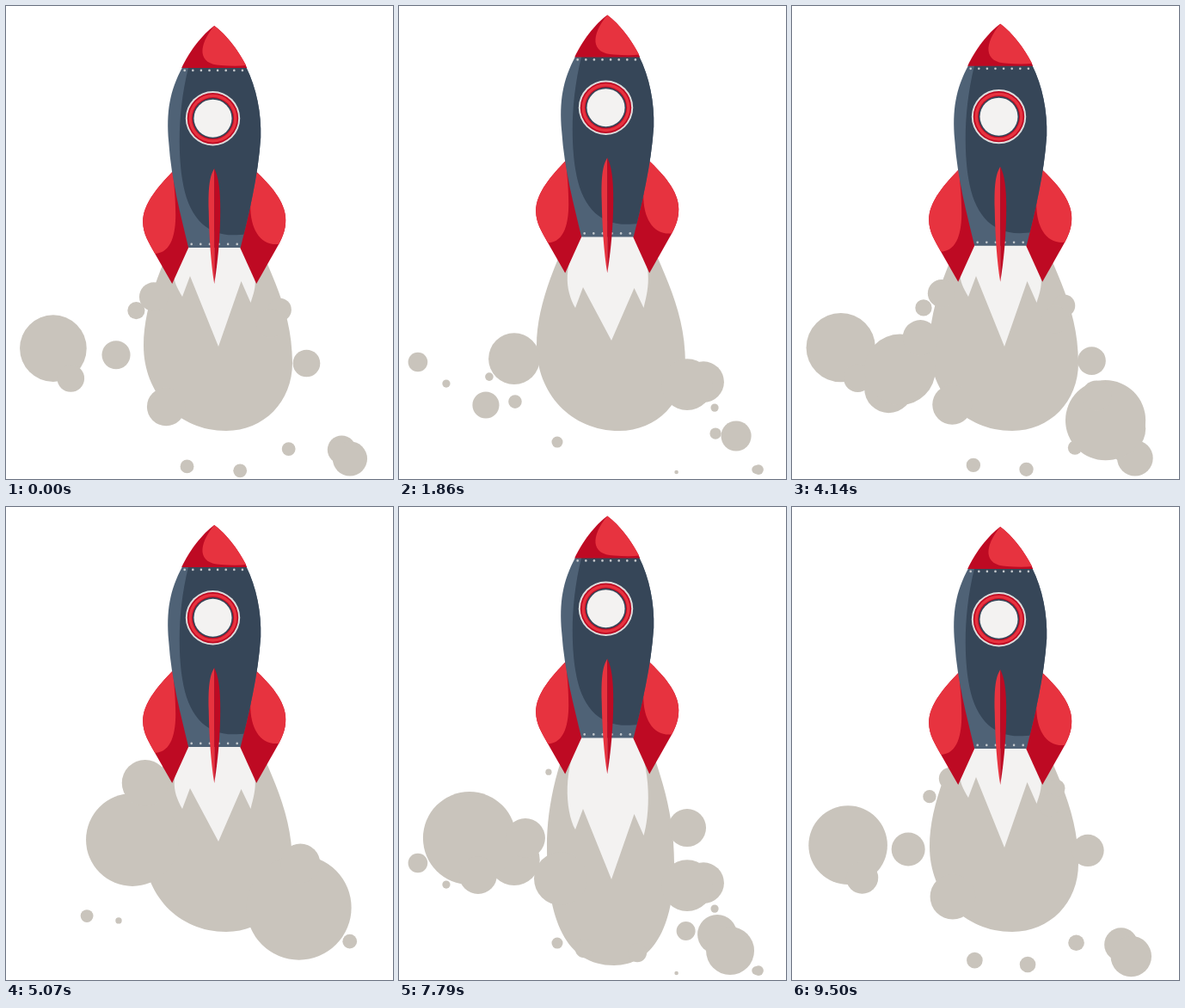
These frames come from a looping animation (450x550 px, 9.57 s). An HTML page with a canvas:

```html
<!DOCTYPE html>
<html lang="en">
<head>
<meta charset="utf-8">
<title>Rocket</title>
<style>
  html, body { margin: 0; width: 100%; height: 100%; overflow: hidden; background: #fff; }
  canvas { display: block; }
</style>
</head>
<body>
<canvas id="stage" width="450" height="550"></canvas>
<script>
const ctx = document.getElementById('stage').getContext('2d');
const LOOP = 9570, FLICKER = LOOP / 3;
const RED = '#e7333f', CRIMSON = '#be0a23', NAVY = '#364658', STEEL = '#4f6276',
      WHITE = '#f3f2f1', SMOKE = '#c9c4bc';

const clamp = u => Math.min(1, Math.max(0, u));
const lerp = (a, b, u) => a + (b - a) * u;
const ease = u => u * u * (3 - 2 * u);
const pulse = (t, peak, width) => ease(clamp(1 - Math.abs(t - peak) / width));

const fill = (color, d) => { ctx.fillStyle = color; ctx.fill(new Path2D(d)); };
const disc = (color, x, y, r) => {
  ctx.fillStyle = color;
  ctx.beginPath();
  ctx.arc(x, y, r, 0, 7);
  ctx.fill();
};

// The rocket alternately rises and sinks, starting at these times
const moves = [100, 800, 1310, 3150, 4000, 4660, 5250, 5870, 6440, 8060];
const bob = t => moves.reduce((y, start, i) =>
  y + (i % 2 ? 12.5 : -12.5) * ease(clamp((t - start) / 550)), 12.5);

// Each puff: position, drift, size
const outer = {
  life: 1.2, span: 810,
  launches: [-365, 1050, 2497, 3800, 5380, 6430, 6980, 7790, 9273],
  puffs: [
    [82, 385, -60, 29, 54], [92, 428, -37, 11, 22], [147, 385, -42, 46, 23],
    [174, 308, -50, 102, 18], [203, 279, -69, 131, 30], [289, 284, 65, 153, 24],
    [285, 310, 50, 130, 30], [335, 373, 32, 94, 22], [188, 432, -4, 75, 31],
    [370, 497, 45, 42, 23], [385, 516, 33, 23, 28]
  ]
};
// Crumbs falling off the bottom of the cloud
for (let angle = -.33; angle < 1; angle += .5) {
  outer.puffs.push([256 + 125 * Math.sin(angle), 395 + 125 * Math.cos(angle), -11, 49, 11]);
}
const inner = {
  life: 1.3, span: 1270,
  launches: [590, 3210, 3597, 5160],
  puffs: [[144, 392, -43, 72, 54], [344, 468, 48, 32, 61], [160, 330, -25, 130, 27], [344, 420, 24, 77, 23]]
};

function drawPuffs({ life, span, launches, puffs }, t) {
  for (const launch of launches) {
    const s = (t - launch) / span;
    if (s < -.25 || s > life) continue;
    const birth = clamp((s + .25) / .18);
    const shrink = 1 - (Math.max(0, s) / life) ** 1.3;
    const swell = lerp(.2, 1, clamp(s)) * clamp((life - s) * 5);
    // Puffs close to the nozzle swell on their way, the others shrink
    for (const [x, y, dx, dy, size] of puffs) {
      disc(SMOKE, x + dx * s, y + dy * s, size * birth * (y < 320 ? swell : shrink));
    }
  }
}

function drawCloud(stretch) {
  const left = lerp(160, 172, stretch), right = lerp(333, 320, stretch);
  const low = lerp(494, 533, stretch), mid = lerp(256, 250, stretch), side = lerp(450, 480, stretch);
  fill(SMOKE, `M${mid} ${low}C${mid - 56} ${low} ${left} ${side} ${left} 395
    C${left} 345 185 290 215 230H275C300 300 ${right} 345 ${right} 415
    C${right} ${side + 10} ${mid + 44} ${low} ${mid} ${low}Z`);
}

function drawFlame(stretch, blunt, shift) {
  const top = 262 + shift, drop = 37 * stretch, side = drop + 13 * blunt;
  fill(WHITE, `M213 ${top}C190 ${top + 40} 193 ${316 + side} 205 ${338 + side}
    L214 ${314 + side}L247 ${396 + drop - 7 * blunt}L273.5 ${320 + drop + 8 * blunt}
    L284.5 ${345 + drop + 6 * blunt}C291 ${325 + drop} 296 ${top + 40} 272 ${top}Z`);
}

function drawRocket() {
  fill(CRIMSON, 'M194 179C178 196 159 216 159 238C159 252 166 262 173 275L193 310L212 268L206 200Z');
  fill(RED, 'M194 179C178 196 159 216 159 238C159 252 166 262 173 275C193 274 197 250 197 230C197 210 195 195 194 179Z');
  fill(CRIMSON, 'M290 179C306 194 325 214 325 236C325 248 321 256 317 264L291 310L272 268L278 200Z');
  fill(RED, 'M290 179C306 194 325 214 325 236C325 248 321 256 317 264C295 266 284 246 284 220Z');

  const hull = 'M205 58C190 86 186 110 189 145C192 190 203 230 212 268H272.5C282 230 293 185 296 140C297 112 291 82 279 58Z';
  fill(STEEL, hull);
  ctx.save();
  ctx.clip(new Path2D(hull));
  fill(NAVY, 'M212 58C199 110 200 160 205 190C212 234 235 260 280 252L300 150V58Z');
  ctx.restore();

  fill(CRIMSON, 'M242 10C228 20 212 41 204 59H280C272 41 256 20 242 10Z');
  fill(RED, 'M242 10C223 33 222 55 250 56Q268 57.5 279 56C270 39 256 20 242 10Z');
  for (let x = 207.5; x < 276; x += 9.6) disc('#c3c8cc', x, 62, 1.3);
  for (let x = 215.5; x < 270; x += 10.6) disc('#c3c8cc', x, 264, 1.3);

  [[31.7, '#dedddd'], [29.7, CRIMSON], [28, RED], [24.6, CRIMSON], [23.6, NAVY], [22, WHITE]]
    .forEach(([r, color]) => disc(color, 240.3, 117.8, r));

  fill(RED, 'M242 176C236 186 235 200 235.5 225C236 255 238 285 242 310Z');
  fill(CRIMSON, 'M242 176C247 186 249 200 249 225C249 255 246 285 242 310Z');
}

function draw(t) {
  const phase = t % FLICKER, shift = bob(t) + .4;
  const stretch = pulse(phase, 1410, 460), blunt = pulse(phase, 1870, 460);
  ctx.clearRect(0, 0, 450, 550);
  drawCloud(stretch);
  drawPuffs(outer, t);
  drawPuffs(inner, t);
  drawFlame(stretch, blunt, shift);
  ctx.save();
  ctx.translate(.2, shift);
  drawRocket();
  ctx.restore();
}

const start = performance.now();
function tick() {
  draw((performance.now() - start) % LOOP);
  requestAnimationFrame(tick);
}
tick();
</script>
</body>
</html>
```
